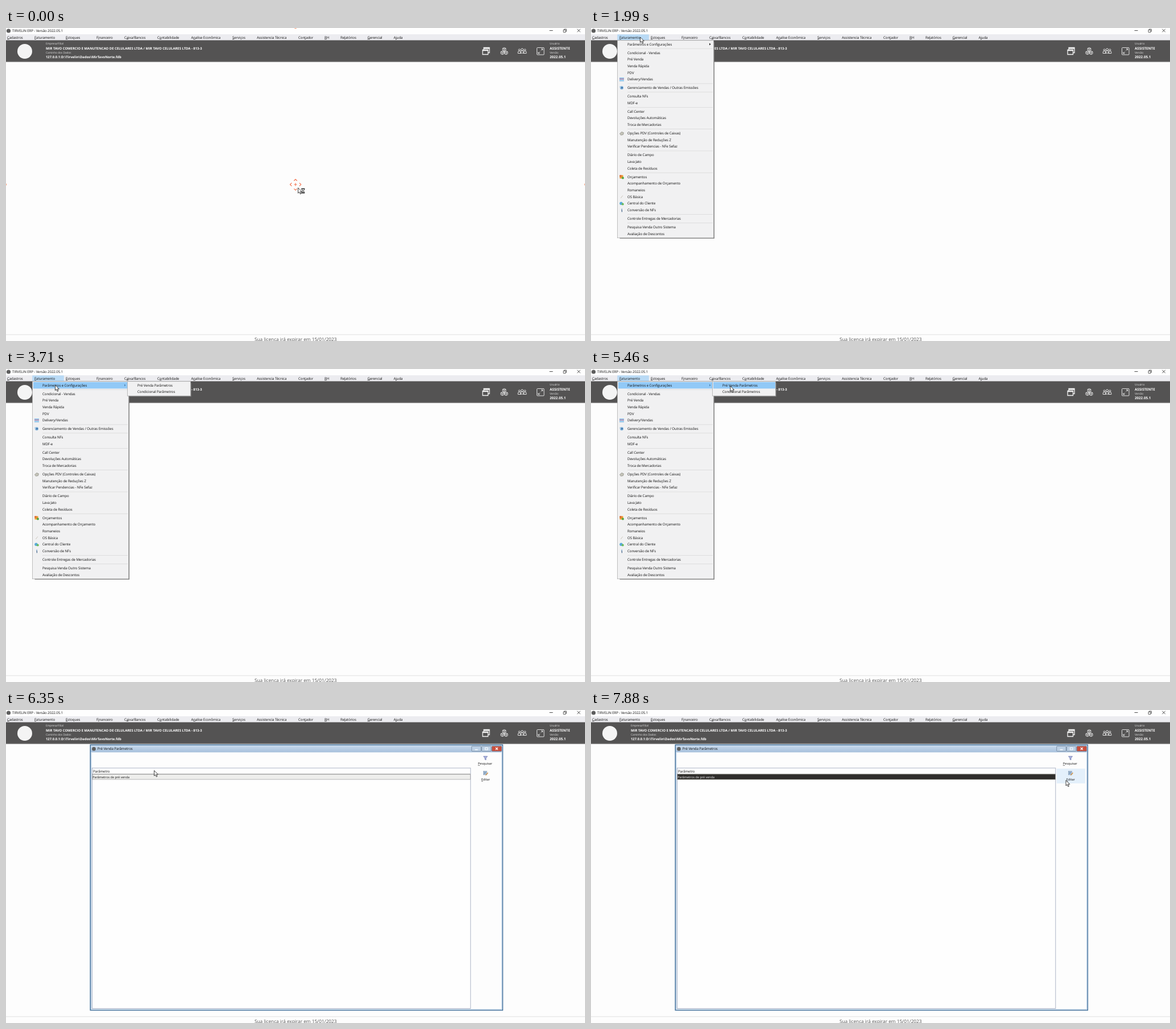
Animation of 1018x550 px, one loop 7.99 s. Source, as an HTML page:

```html
<!DOCTYPE html>
<html lang="pt-BR">
<head>
<meta charset="utf-8">
<title>ERP</title>
<style>
html, body { margin: 0; width: 100%; height: 100%; overflow: hidden; background: #fdfdfd; }
svg { display: block; width: 100%; height: 100%; }
text { font-family: "Open Sans", "Noto Sans", sans-serif; white-space: pre; text-rendering: geometricPrecision; }
.ui { font-size: 6.15px; letter-spacing: -.1px; fill: #111; }
.form { font-size: 5.5px; fill: #111; }
.cap { font-size: 4.75px; fill: #e2e2e2; }
.bold { font-size: 5.9px; font-weight: 700; fill: #fff; }
.user { font-size: 6.2px; font-weight: 700; fill: #fff; }
.status { font-size: 8.27px; fill: #555; }
.mid { text-anchor: middle; }
.u { text-decoration: underline; }
.line { fill: none; stroke: #f2f2f2; }
</style>
</head>
<body>
<svg id="stage" viewBox="0 0 1018 550" preserveAspectRatio="none"></svg>
<script>
const LOOP = 7990;

// "&" marks the underlined access key
const text = (x, y, s, cls = 'ui') =>
  `<text x="${x}" y="${y}" class="${cls}">${s.replace(/&(.)/, '<tspan class="u">$1</tspan>')}</text>`;
const rect = (x, y, w, h, fill, extra = '') =>
  `<rect x="${x}" y="${y}" width="${w}" height="${h}" fill="${fill}" ${extra}/>`;
const path = (d, stroke, width = 1, fill = 'none') =>
  `<path d="${d}" fill="${fill}" stroke="${stroke}" stroke-width="${width}"/>`;
const dot = (x, y, r, fill) => `<circle cx="${x}" cy="${y}" r="${r}" fill="${fill}"/>`;
const group = (id, body) => `<g id="${id}">${body}</g>`;

const menuBar = [
  [2, '&Cadastros'], [50, '&Faturamento'], [105, '&Estoques'], [159, 'F&inanceiro'],
  [208, 'C&aixa/Bancos'], [266, 'C&ontabilidade'], [325.5, 'A&nalise Econômica'],
  [398, '&Serviços'], [441, 'Assistencia Técnica'], [514, 'Con&tador'], [560, '&RH'],
  [588, 'Re&latórios'], [635.5, '&Gerencial'], [681.5, 'A&juda']
];

const menuGroups = [
  ['Parâmetros e Configurações'],
  ['Condicional - Vendas', 'Pré Venda', 'Venda Rápida', 'PDV', 'Delivery/Vendas'],
  ['Gerenciamento de Vendas / Outras Emissões'],
  ['Consulta NFs', 'MDF-e'],
  ['Call Center', 'Devoluções Automáticas', 'Troca de Mercadorias'],
  ['Opções PDV (Controles de Caixas)', 'Manutenção de Reduções Z', 'Verificar Pendencias - NFe Sefaz'],
  ['Diário de Campo', 'Lava Jato', 'Coleta de Resíduos'],
  ['Orçamentos', 'Acompanhamento de Orçamento', 'Romaneios', 'OS Básica', 'Central do Cliente', 'Conversão de NFs'],
  ['Controle Entregas de Mercadorias'],
  ['Pesquisa Venda Outro Sistema', 'Avaliação de Descontos']
];

function titleBar() {
  return rect(0, 0, 1018, 11, '#fefefe') + dot(4.5, 5, 3.6, '#5d5d5d') +
    text(11, 7.4, 'TIRVELIN ERP - Versão 2022.05.1') +
    path('M955.5 4.5h6M1004.3 1.8l5.4 5.4m0-5.4l-5.4 5.4', '#222', .8) +
    path('M980 3.4h4v4h-4zM981.3 3.2V2h4v4h-1.2', '#222', .7);
}

function header() {
  const person = (x, y, r) =>
    `<circle cx="${x}" cy="${y}" r="${r}"/><path d="M${x - r - 1} ${y + 6}v-1.6a${r + 1} 2.6 0 0 1 ${2 * r + 2} 0V${y + 6}z"/>`;
  const cube = (x, y) =>
    `<path d="M${x} ${y}l2.8 1.2v3.5l-2.8 1.2l-2.8-1.2v-3.5zM${x - 2.8} ${y + 1.2}l2.8 1.2l2.8-1.2M${x} ${y + 2.4}v3.5"/>`;
  return rect(0, 21.5, 1018, 38, '#545353') + rect(0, 58.7, 1018, 1, '#8a8a8a') +
    dot(33, 41, 13, '#f4f4f4') +
    text(70, 29.3, 'Empresa/Filial', 'cap') +
    text(70, 37.7, 'MIR TAVO COMERCIO E MANUTENCAO DE CELULARES LTDA / MIR TAVO CELULARES LTDA - 813-3', 'bold') +
    text(70, 45.2, 'Caminho dos Dados', 'cap') +
    text(70, 52.7, '127.0.0.1:D:\\Tirvelin\\Dados\\MirTavoNorte.fdb', 'bold') +
    text(956, 29.3, 'Usuário', 'cap') + text(956, 37.7, 'ASSISTENTE', 'user') +
    text(956, 45.2, 'Versão', 'cap') + text(956, 52.7, '2022.05.1', 'user') +
    `<g class="line" stroke-width=".9">
      <path d="M840 38v-3.5h10v9h-2M840 36h10" stroke-width="1.3"/>
      <path d="M838 38.5h9.5v8H838zM838 39.5h9.5" stroke-width="1.3"/>
      ${cube(876, 34.5)}${cube(872.8, 40.5)}${cube(879.2, 40.5)}
      ${person(902.6, 38.5, 1.5)}${person(912.4, 38.5, 1.5)}${person(907.5, 38, 2)}
      <rect x="933.5" y="34.5" width="12.5" height="12.5" rx="1"/>
      <path d="M940.6 39.6l3-3m-2.6 0h2.6v2.6M938.8 41.8l-3 3m2.6 0h-2.6v-2.6"/>
    </g>`;
}

function panel(x, y, w, h) {
  return path(`M${x + 4} ${y + h + .6}H${x + w + .6}V${y + 3}`, '#777', 1.4) +
    rect(x, y, w, h, '#f1f1f2', 'stroke="#a6a6a6" stroke-width=".7"');
}

function menu() {
  let y = 28.5, rows = '';
  menuGroups.forEach((items, g) => {
    if (g) {
      y += 3.2;
      rows += rect(64, y - 7.6, 150, .7, '#d6d6d6');
    }
    for (const s of items) {
      rows += text(64, (y + 2.1).toFixed(1), s);
      y += 11.7;
    }
  });
  const icons =
    rect(50, 87.3, 8, 6.2, '#78b6e4') + rect(50, 89, 8, 1.2, '#e48aa0') + rect(50, 91.4, 8, .8, '#dff0fb') +
    dot(54, 105, 3, '#7fb0d8') + dot(54.4, 105, 1.2, '#2d5f93') + dot(51.5, 103.5, 1.2, '#a9cbe8') +
    path('M50.5 185.5l3.5-3l3.5 1.5l-1 3.5l-4 .8z', '#8b8b83', .7, '#c4c3b9') +
    rect(50.4, 258.6, 6.2, 5.8, '#eb9b32', 'rx="1"') + rect(50.4, 258.6, 3, 2.5, '#d95e35') + dot(56, 263.6, 2, '#50a446') +
    path('M52.3 299l3.5-4.6', '#c4c0b5', .9) +
    dot(53, 308.2, 2.7, '#59abd8') + dot(55.8, 309.5, 2, '#6dbb5b') +
    dot(54.2, 318.2, .8, '#4d8ac3') + path('M53.4 320h1v3.2', '#31577f', 1.1);
  return panel(46.5, 21.8, 169.2, 347) +
    group('itemHot', rect(48, 23, 166.5, 11.4, '#91c9f7')) + rows + icons +
    group('arrowDark', path('M208.2 26.6v3.8l2.4-1.9z', 'none', 0, '#111')) +
    group('arrowLight', path('M208.2 26.6v3.8l2.4-1.9z', 'none', 0, '#4d83b0'));
}

function submenu() {
  return panel(213.6, 21.8, 111, 25.4) +
    group('subHot', rect(215, 23, 109, 11.4, '#91c9f7')) +
    text(231, 30.6, 'Pré Venda Parâmetros') + text(231, 42.4, 'Condicional Parâmetros');
}

function childWindow() {
  const button = (x, w, fill) => rect(x, 63.6, w, 8.8, fill, 'rx="1" stroke="#64788f" stroke-width=".7"');
  return rect(148.3, 61.3, 725, 466.2, '#fdfdfd', 'stroke="#3d6c98" stroke-width="1.5"') +
    rect(149, 62, 723.6, 12.4, 'url(#caption)') +
    path('M150 74.5V526.2H871.7V74.5', '#bed3e8', 1.3) +
    dot(154.5, 68.4, 3.3, '#5d5d5d') + text(160.7, 70.3, 'Pré Venda Parâmetros') +
    button(818.7, 16.5, '#bcd0e5') + button(836.4, 16.5, '#bcd0e5') + button(854.2, 17.3, '#cb4e3c') +
    path('M824.5 69.8h5', '#fff', 1.3) + path('M842.4 66.3h4.6v3.6h-4.6z', '#fff', 1) +
    path('M860.8 66l4 4m0-4l-4 4', '#fff', 1.2) +
    rect(151.4, 102, 665.4, 422.5, '#fefefe', 'stroke="#a3abc0" stroke-width=".9"') +
    rect(151.5, 112, 665, .8, '#8d8d8d') + text(153, 109.9, 'Parâmetro') +
    group('rowIdle', rect(152, 113, 664.3, 9, '#eeeeec', 'stroke="#8b8b8b" stroke-width=".6"') +
      text(152.3, 119.7, 'Parâmetros de pré venda', 'form')) +
    group('rowHot', rect(152, 113, 664.3, 9, '#2f2d2b', 'stroke="#77756a" stroke-width=".6"') +
      `<g style="--c:1">${text(152.3, 119.7, 'Parâmetros de pré venda', 'form').replace('class', 'style="fill:#eee" class')}</g>`) +
    group('editHot', rect(818.8, 103, 50, 26, '#e4f0fb')) +
    path('M839.5 81.3h7l-2.5 3.4v3l-2-.8v-2.2z', '#6873ad', .7, '#a9b2de') +
    text(842.3, 96.1, '&Pesquisar', 'form mid') +
    rect(839.3, 107.5, 6, 6.4, '#a8c1dc', 'stroke="#7288a4" stroke-width=".5"') +
    path('M840.5 109.6h3.6m-3.6 2h2.6', '#50687f', .6) + path('M843.4 114.6l4-4.4', '#d6923d', 1.4) +
    text(843.3, 123.9, '&Editar', 'form mid');
}

function dockGuide() {
  return path('M506.3 268.5l2.7-2.7l2.7 2.7M506.3 282.3l2.7 2.7l2.7-2.7M502.3 272.2l-2.8 2.8l2.8 2.8' +
    'M515.9 272.2l2.8 2.8l-2.8 2.8M506.5 275h5M509 272.5v5', '#f4714c', 1.1) +
    path('M506.5 0h5l-2.5 1.6zM0 272.8v4.4l1.5-2.2zM1018 272.8v4.4l-1.5-2.2z', 'none', 0, '#f9a27f');
}

function cursor() {
  return path('M0 0V9.4L2.2 7.4L3.8 11L5.4 10.3L3.9 6.8H6.8Z', '#111', .8, '#fff') +
    group('busy', path('M5.8 1.6h6M5.8 9h6', '#111', 1.2) +
      path('M6.6 2v1.2l1.7 2.1l-1.7 2.1v1.2h4.4V7.4L9.3 5.3L11 3.2V2z', '#111', .9, '#fff') +
      path('M7.6 8l1.2-1.4L10 8z', 'none', 0, '#111'));
}

const stage = document.getElementById('stage');
stage.innerHTML =
  `<defs><linearGradient id="caption" x2="0" y2="1"><stop stop-color="#c9daec"/><stop offset="1" stop-color="#a6c0dc"/></linearGradient></defs>` +
  rect(0, 0, 1018, 550, '#fdfdfd') + titleBar() + rect(0, 11, 1018, 10.6, '#ececf0') +
  group('tabHot', rect(46.3, 11.3, 55.5, 10, '#b9daf5')) +
  menuBar.map(([x, s]) => text(x, 18.5, s)).join('') + header() +
  rect(0, 538.4, 1018, .9, '#dedede') + text(437, 550, 'Sua licença irá expirar em 15/01/2023', 'status') +
  group('guide', dockGuide()) + group('child', childWindow()) +
  group('ghost', path('M50 369.4H216.4V25', '#6f6f6f', 1.3)) +
  group('menu', menu()) + group('submenu', submenu()) + group('cursor', cursor());

const parts = {};
stage.querySelectorAll('g[id]').forEach(g => parts[g.id] = g);
const show = (id, v) => parts[id].style.opacity = Number(v);

const clamp = v => Math.max(0, Math.min(1, v));
const within = (t, a, b) => t >= a && t < b;

// time, x, y of the pointer tip
const track = [
  [590, 513.5, 280.8], [1360, 106.5, 69], [1430, 106, 67], [1800, 86.5, 16],
  [2420, 86.5, 16], [2560, 84.5, 20.3], [3060, 84.5, 20.3], [3290, 86.5, 28.3],
  [3720, 86.5, 28.3], [4310, 238, 28], [4370, 238, 28], [4540, 245, 30],
  [5640, 245, 30], [6230, 258, 84], [6290, 258, 85], [6350, 260.5, 106.3],
  [6830, 264, 121], [7100, 264, 121], [7870, 835, 123.6]
];

function pointerAt(t) {
  const i = track.findIndex(k => k[0] > t);
  if (i === 0) return track[0].slice(1);
  if (i < 0) return track[track.length - 1].slice(1);
  const [ta, xa, ya] = track[i - 1], [tb, xb, yb] = track[i];
  const u = (t - ta) / (tb - ta), e = u * u * (3 - 2 * u);
  return [xa + (xb - xa) * e, ya + (yb - ya) * e];
}

function draw(t) {
  const [x, y] = pointerAt(t);
  parts.cursor.setAttribute('transform', `translate(${x.toFixed(2)} ${y.toFixed(2)})`);
  show('guide', t < 50);
  show('busy', t < 170);
  show('tabHot', within(t, 1700, 5560));
  show('ghost', within(t, 2740, 2840) || within(t, 5560, 5620));
  show('menu', within(t, 1900, 2740) || within(t, 2950, 5560));
  const onItem = t >= 3180;
  show('itemHot', onItem);
  show('arrowDark', !onItem);
  show('arrowLight', onItem);
  show('submenu', t < 5560 ? clamp((t - 3540) / 100) : 0);
  show('subHot', t >= 4370);
  show('child', t >= 5850);
  show('rowIdle', t < 6720);
  show('rowHot', t >= 6720);
  show('editHot', t >= 7700);
}

function tick() {
  draw(performance.now() % LOOP);
  requestAnimationFrame(tick);
}
draw(0);
tick();
</script>
</body>
</html>
```
